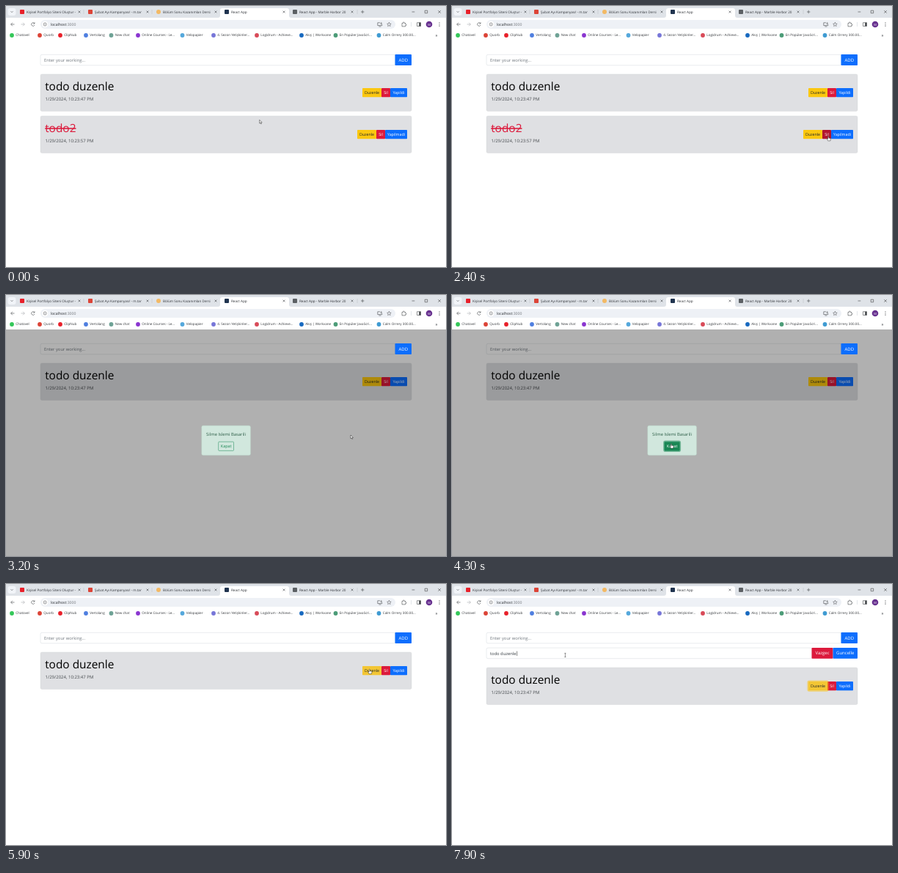
Recreate the animation shown at these times as an HTML page. Size 600 by 356 pixels, loop 8000 ms.

```html
<!DOCTYPE html>
<html lang="tr">
<head>
<meta charset="utf-8">
<title>Todo</title>
<style>
  html, body { margin: 0; width: 100%; height: 100%; overflow: hidden; background: #fff; }
  svg { display: block; width: 100%; height: 100%; }
  text { font-family: "Open Sans", "Noto Sans", sans-serif; text-rendering: geometricPrecision; white-space: pre; }
</style>
</head>
<body>
<svg viewBox="0 0 600 356">
  <g id="page"></g>
  <g id="browser"></g>
  <g id="pointer"></g>
</svg>
<script>
const LOOP = 8000, STEP = 100;
const BLUE = '#0d6efd', RED = '#dc1a3c', DARK_RED = '#b2162f', YELLOW = '#fbc70f', GREEN = '#198754', INK = '#212529';

const layer = id => document.getElementById(id);
const rect = (x, y, w, h, fill, more = '') =>
  `<rect x="${x}" y="${y}" width="${w}" height="${h}" fill="${fill}" ${more}/>`;
const dot = (x, y, r, fill, more = '') => `<circle cx="${x}" cy="${y}" r="${r}" fill="${fill}" ${more}/>`;
const line = (d, color = '#44474a', width = .6) =>
  `<path d="${d}" fill="none" stroke="${color}" stroke-width="${width}"/>`;
const text = (x, y, size, str, fill = INK, more = '') =>
  `<text x="${x}" y="${y}" font-size="${size}" fill="${fill}" ${more}>${str}</text>`;

function button(x, y, w, h, label, size, fill, color = '#fff', ring = '') {
  const halo = ring && rect(x - .8, y - .8, w + 1.6, h + 1.6, 'none',
    `rx="2" stroke="${ring}" stroke-opacity=".5" stroke-width="1.6"`);
  return halo + rect(x, y, w, h, fill, 'rx=".8"') +
    text(x + w / 2, y + h / 2 + size * .36, size, label, color, 'text-anchor="middle"');
}

// Browser window: tabs, toolbar, bookmarks
function browserMarkup() {
  const tabs = [
    ['Kişisel Portfolyo Siteni Oluştur -', '#e8202a'],
    ['Şubat Ayı Kampanyası! - m.tar', '#dc4437'],
    ['Bölüm Sonu Kazanımları Dersi', '#f3b964'],
    ['React App', '#20344f'],
    ['React App - Marble Harbor 20', '#5c6064']
  ];
  const bookmarks = [
    [8, 'Chatovel', '#35c759'], [46, 'Quorb', '#dc4437'], [74, 'ClipNub', '#e8202a'],
    [109, 'Vertolang', '#4f7fe0'], [143.5, 'New chat', '#6ea295'], [180, 'Online Courses - Le...', '#8a35d0'],
    [240.5, 'Velopapier', '#55a8dc'], [283, '4. Sezon Yetişkinler...', '#7776d8'],
    [342, 'Logidrum - Achieve...', '#d84a58'], [403, 'Akış | Workvane', '#1769c0'],
    [449.5, 'En Popüler JavaScri...', '#4c9c78'], [508.5, 'Calm Orrery 300.00...', '#3f9bd2']
  ];
  let out = rect(0, 0, 600, 47, '#fff') + rect(0, 0, 600, 16, '#dfe3e8') +
    '<path d="M289 16Q292 16 292 13V6Q292 3 295 3H383Q386 3 386 6V13Q386 16 389 16Z" fill="#fff"/>' +
    rect(2.5, 3, 11, 10, '#f1f4f8', 'rx="3"') + line('M6.5 7.2L8 8.7 9.5 7.2');
  tabs.forEach(([title, color], i) => {
    const x = 22 + i * 93, close = x + 78;
    out += (i === 2 ? dot(x, 8, 3, color) : rect(x - 3, 5, 6, 6, color, 'rx="1"')) +
      text(x + 6, 9.7, 4.6, title, '#303338') +
      line(`M${close - 1.4} 6.6l2.8 2.8m0-2.8l-2.8 2.8`);
  });
  out += line('M106 5v6M199 5v6M479 5v6', '#b4b8bd', .4) +
    line('M484 8h4.4M486.2 5.8v4.4') +
    line('M553.5 8h3.8M571.2 6.2h3.5v3.5h-3.5zM589.3 6.2l3.5 3.5m0-3.5l-3.5 3.5', '#222', .5);

  out += rect(47, 19, 484, 12, '#eef1f6', 'rx="6"') +
    line('M11.5 25H6.7M8.9 22.7L6.6 25l2.3 2.3') +
    line('M20.5 25h4.8M23.1 22.7l2.3 2.3-2.3 2.3', '#a7aaad') +
    line('M38.8 23.7A2.3 2.3 0 1 0 39 26M39 22.3v1.8h-1.9') +
    dot(53.2, 25, 4.3, '#fff') + dot(53.2, 25, 2.1, 'none', 'stroke="#44474a" stroke-width=".5"') +
    line('M53.2 24.7v1.4M53.2 23.6v.5', '#44474a', .5) +
    text(61, 26.9, 5.1, 'localhost<tspan fill="#707479">:3000</tspan>') +
    line('M510 22.8h-3.2v3.8h6v-1.4M508.4 28h3M511.7 22v2.8m-1.2-1.1l1.2 1.2 1.2-1.2') +
    line('M522.4 22.2l.8 1.9 2 .2-1.5 1.3.4 2-1.7-1-1.7 1 .4-2-1.5-1.3 2-.2z', '#44474a', .5) +
    line('M540 23.4h1.6v-.6a.8 .8 0 0 1 1.6 0v.6h1.5v1.5h.5a.8 .8 0 0 1 0 1.6h-.5v1.4H540z') +
    line('M552.5 22v6', '#c7ccd3', .5) +
    line('M560.5 22.7h5v4.8h-5z') + rect(563.2, 22.7, 2.3, 4.8, '#44474a') +
    dot(577, 25, 4.3, '#67308f') + text(577, 26.5, 4, 'M', '#fff', 'text-anchor="middle"') +
    [22.8, 25, 27.2].map(y => dot(591, y, .6, '#44474a')).join('');

  for (const [x, label, color] of bookmarks)
    out += dot(x, 40, 2.9, color) + text(x + 5.3, 41.1, 4.55, label, '#34373b');
  return out + text(585.5, 41.6, 6, '»', '#34373b');
}

function inputRow(y, width, value, color) {
  return rect(47, y, width, 14.6, '#fff', 'rx="2" stroke="#d3d8dd" stroke-width=".5"') +
    text(52, y + 9.4, 5.8, value, color);
}

function card(y, title, date, done, look) {
  const x = done ? 479 : 486, top = y + 19;
  const titleStyle = 'font-weight="500"' + (done ? ' text-decoration="line-through"' : '');
  return rect(47, y, 506, 50.5, '#dfe0e3', 'rx="2" stroke="#d2d4d7" stroke-width=".4"') +
    text(53.2, y + 22.4, 15.4, title, done ? RED : '#000', titleStyle) +
    text(53.5, y + 35.8, 6, date, '#45494d') +
    button(x + 26, top, 12, 12.2, 'Sil', 5.3, look.sil || RED, '#fff', look.silRing) +
    button(x + 38, top, done ? 30 : 23, 12.2, done ? 'Yapilmadi' : 'Yapildi', 5.3, BLUE) +
    button(x, top, 26, 12.2, 'Duzenle', 5.3, look.edit || YELLOW, INK, look.editRing);
}

function pageMarkup(t) {
  const modal = t >= 2500 && t < 4700, editing = t >= 6200;
  let out = rect(0, 47, 600, 309, '#fff') + inputRow(66.3, 484, 'Enter your working...', '#70777e');
  const add = button(530.5, 66, 22.5, 15, 'ADD', 6, BLUE);
  if (editing) {
    out += inputRow(87.1, 444, 'todo duzenle', '#343a40') +
      button(490.5, 86.9, 29, 14.8, 'Vazgec', 6, RED) +
      button(519.5, 86.9, 33.5, 14.8, 'Guncelle', 6, BLUE);
    const caretOn = t >= 6900 && (t - 6900) % 1000 < 500;
    if (caretOn) out += line('M88.6 91.6v6.4', '#111', .5);
  }
  out += card(editing ? 114 : 93, 'todo duzenle', '1/29/2024, 10:23:47 PM', false, {
    edit: t >= 5900 && '#f3c634', editRing: editing ? '#ffc107' : ''
  });
  if (t < 2600) out += card(150, 'todo2', '1/29/2024, 10:23:57 PM', true, {
    sil: t >= 1200 && DARK_RED, silRing: modal ? '#f06080' : ''
  });
  if (!modal) return out + add;

  const hover = t >= 4200;
  return out + rect(0, 47, 600, 309, '#000', 'opacity=".31"') + add +
    rect(266.8, 178.2, 66.6, 40.4, '#d1e7dd', 'rx="2" stroke="#badbcc" stroke-width=".4"') +
    text(300, 191.7, 5.85, 'Silme Islemi Basarili', '#2c5d46', 'text-anchor="middle"') +
    button(289.7, 200.2, 20.8, 12.2, 'Kapat', 5.4, hover ? GREEN : 'none', hover ? '#fff' : GREEN, t >= 4300 ? GREEN : '') +
    rect(289.7, 200.2, 20.8, 12.2, 'none', `rx="1" stroke="${GREEN}" stroke-width=".5"`);
}

// Pointer shapes, drawn from their hot spot
const shapes = {
  arrow: '<path d="M0 0V4.8L1.1 3.8 1.9 5.6 2.7 5.2 1.9 3.5H3.4Z" fill="#fff" stroke="#111" stroke-width=".45"/>',
  hand: '<path d="M-.6 .3Q0-.5 .6 .3V2.4L2.9 3Q3.4 3.2 3.2 4L2.7 6.3H-.5L-2 3.9Q-1.6 3.1-.6 3.9Z" fill="#fff" stroke="#111" stroke-width=".45"/>',
  beam: line('M-1-2.6H1M0-2.6V2.6M-1 2.6H1', '#222', .5)
};

// [first step, last step, x, y, shape on arrival]
const moves = [
  [900, 1200, 508, 176, 'hand'], [1800, 2000, 513.2, 177.6, 'hand'],
  [3200, 3200, 470, 191, 'arrow'], [3500, 3700, 318, 213, 'arrow'],
  [4000, 4300, 299, 202.8, 'hand'], [4700, 4700, 296.8, 202.5, 'arrow'],
  [4800, 4800, 430, 122, 'arrow'], [5300, 5400, 478, 125, 'arrow'],
  [5800, 5900, 495.7, 116.3, 'hand'], [6200, 6200, 495.7, 116.3, 'arrow'],
  [6900, 6900, 154.4, 97, 'beam']
];

function pointerMarkup(t) {
  let x = 345.7, y = 155.3, shape = 'arrow';
  for (const [first, last, toX, toY, arrival] of moves) {
    if (t < first) break;
    const p = Math.min(1, (t - first + STEP) / (last - first + STEP));
    const eased = p * (2 - p);
    x += (toX - x) * eased;
    y += (toY - y) * eased;
    shape = p === 1 ? arrival : 'arrow';
  }
  return `<g transform="matrix(1 0 0 1 ${x} ${y})">${shapes[shape]}</g>`;
}

layer('browser').innerHTML = browserMarkup();
const start = performance.now();
let shown = -1;

function render() {
  const elapsed = (performance.now() - start) % LOOP;
  const t = Math.floor(elapsed / STEP) * STEP;
  if (t !== shown) {
    shown = t;
    layer('page').innerHTML = pageMarkup(t);
    layer('pointer').innerHTML = pointerMarkup(t);
  }
  requestAnimationFrame(render);
}
render();
</script>
</body>
</html>
```
